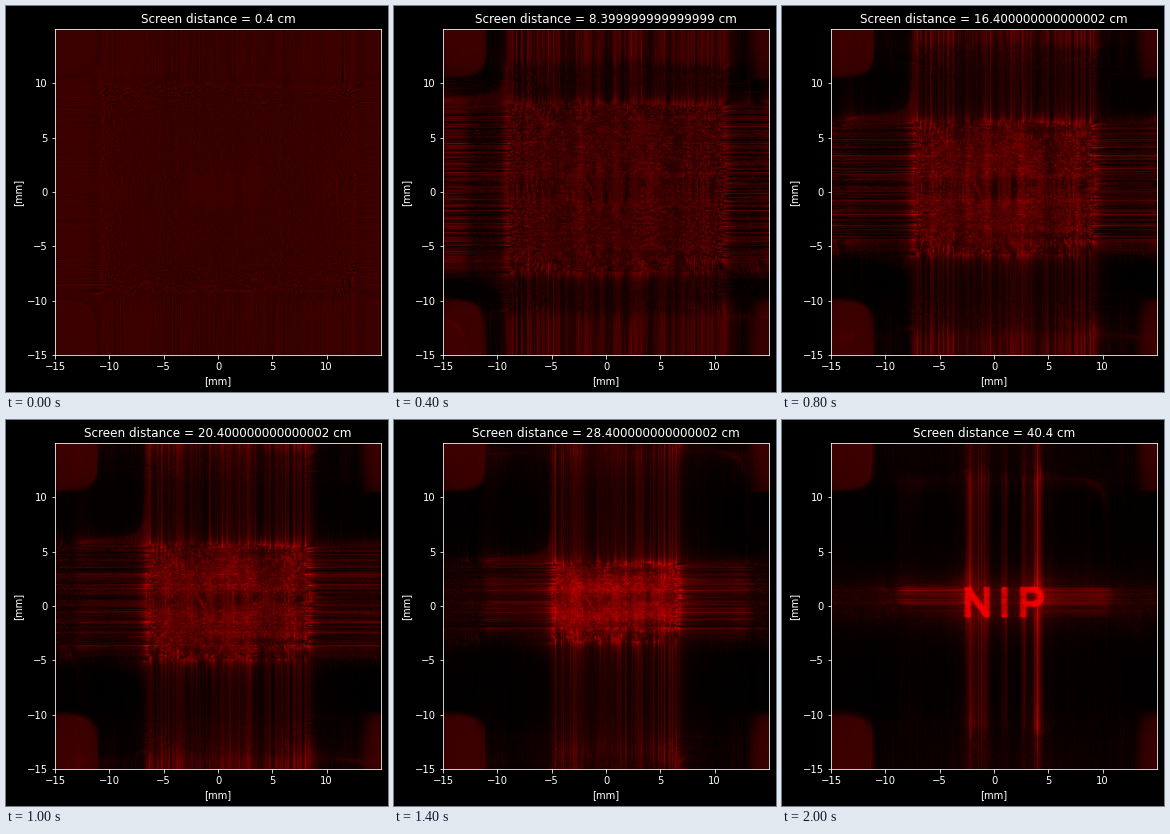
Recreate the animation shown at these times as a matplotlib script. Size 382 px wide and 386 px high, loop 2200 ms.

```python
import numpy as np
import matplotlib.pyplot as plt
from matplotlib.animation import FuncAnimation
from matplotlib.colors import LinearSegmentedColormap

W, H, DPI = 382, 386, 72

# Optics, all lengths in mm
N, SIZE = 2048, 30.0
DX = SIZE / N
WAVE = 632.8e-6
FOCUS = 400.0
STEPS = 11
ROUNDS = 1          # phase retrieval iterations
GAIN = 0.045        # exposure of the uniform beam

x = (np.arange(N) - N // 2) * DX
freq = np.fft.fftfreq(N, DX)


def letters():
    X, Y = np.meshgrid(x, x)
    low, high, half = -1.02, 1.7, 0.22
    tall = (Y > low) & (Y < high)
    mask = np.zeros((N, N), bool)
    for stem in (-2.42, -0.70, 0.96, 2.70):
        mask |= tall & (abs(X - stem) < half)
    # diagonal of the N
    slant = -2.42 + 1.72 * (high - 0.2 - Y) / (high - low - 0.4)
    mask |= tall & (abs(X - slant) < 0.28) & (X > -2.64) & (X < -0.48)
    # bowl of the P
    mid, radius = 0.84, 0.86
    d = np.hypot(np.maximum(X - 3.68, 0), Y - mid)
    mask |= (X > 2.7) & (d < radius) & (d > radius - 0.42)
    return mask.astype(float)


def propagate(spectrum, z):
    k = np.exp(-1j * np.pi * WAVE * z * freq ** 2)
    spectrum *= k[:, None]
    spectrum *= k[None, :]
    return np.fft.ifft2(spectrum)


def unit(a):
    a /= np.abs(a) + 1e-30
    return a


def to_mask(image):
    """Phase-only field; a faint flat wave fills the almost dark corners."""
    field = propagate(np.fft.fft2(image), -FOCUS)
    rim, mid = slice(0, N // 10), slice(N // 2 - 200, N // 2 + 200)
    corner = np.median(np.abs(field[rim, rim]))
    arm = np.median(np.abs(field[rim, mid]))
    return unit(field + np.sqrt(corner * arm))


def hologram():
    target = letters()
    mask = to_mask(target)
    for _ in range(ROUNDS):
        image = propagate(np.fft.fft2(mask), FOCUS)
        mask = to_mask(target * unit(image))
    return mask


def red_level(field):
    light = np.clip(GAIN * (field.real ** 2 + field.imag ** 2), 0, 1)
    light = light.astype(np.float32)
    level = np.where(light < 0.0031308, 12.92 * light,
                     1.055 * light ** (1 / 2.4) - 0.055)
    return level.reshape(N // 2, 2, N // 2, 2).mean(axis=(1, 3))


distances = [0.004]
while len(distances) < STEPS:
    distances.append(distances[-1] + 0.04)

beam = np.fft.fft2(hologram())
screens = [red_level(propagate(beam.copy(), 1000 * z)) for z in distances]

plt.style.use("dark_background")
plt.rcParams["font.family"] = "DejaVu Sans"

fig = plt.figure(figsize=(W / DPI, H / DPI), dpi=DPI, facecolor="black")
ax = fig.add_axes([49 / W, 37 / H, 326 / W, 326 / H])
reds = LinearSegmentedColormap.from_list("beam", ["black", "red"])
picture = ax.imshow(screens[0], cmap=reds, vmin=0, vmax=1, origin="lower",
                    extent=(-15, 15, -15, 15), interpolation="hanning",
                    aspect="auto")
ax.set_xticks(range(-15, 11, 5))
ax.set_yticks(range(-15, 11, 5))
ax.set_xlabel("[mm]")
ax.set_ylabel("[mm]")
title = ax.set_title("")


def draw(i):
    picture.set_data(screens[i])
    title.set_text(f"Screen distance = {distances[i] * 100} cm")
    return picture, title


anim = FuncAnimation(fig, draw, frames=STEPS, interval=200, repeat=True,
                     init_func=lambda: draw(0))
plt.show()
```
